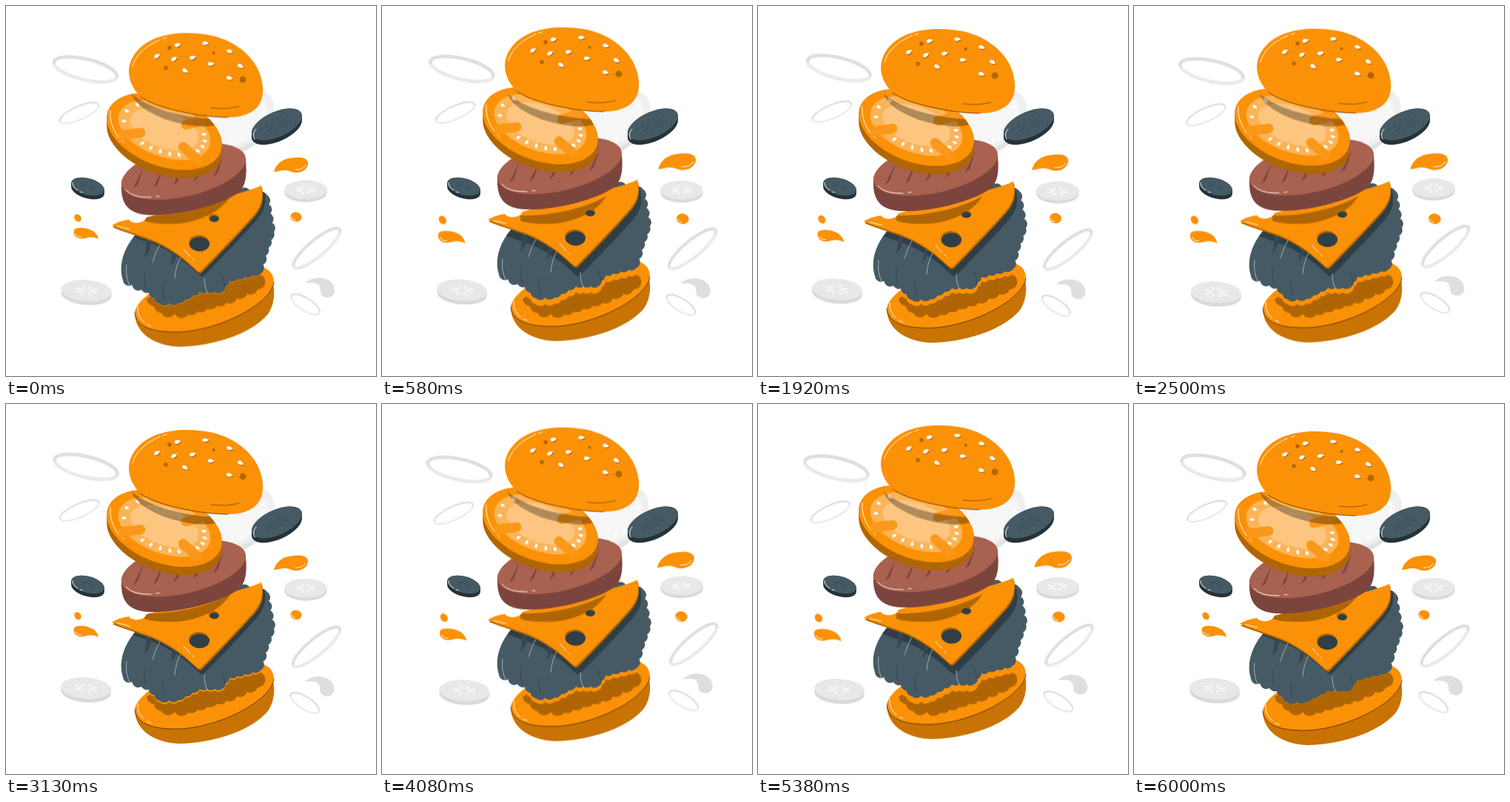
An HTML page that plays this animation: 500 by 500 pixels, repeating every 6.04 s.

```html
<!DOCTYPE html>
<html lang="en">
<head>
<meta charset="utf-8">
<title>Floating burger</title>
<style>
  html, body { margin: 0; width: 100%; height: 100%; overflow: hidden; background: #fff; }
  svg { display: block; width: 100vw; height: 100vh; }
  .sway { transform-origin: 257px 243px; }
  .pulse { transform-origin: 249px 260px; }
  .line { fill: none; stroke-linecap: round; }
</style>
</head>
<body>
<svg id="stage" viewBox="0 0 500 500"></svg>
<script>
const ORANGE = '#fb9106', SIDE = '#c87304', DARK = '#b06603';
const SLATE = '#455a64', INK = '#263238', FOLD = '#36474f';
const MEAT = '#a96150', CRUST = '#7b453e';
const SHADE = 'fill="#000" fill-opacity=".3"';
const RAD = Math.PI / 180;

const range = n => [...Array(n).keys()];
const path = (d, fill, more = '') => `<path d="${d}" fill="${fill}" ${more}/>`;
const line = (d, color, w = 1, more = '') =>
  `<path class="line" d="${d}" stroke="${color}" stroke-width="${w}" ${more}/>`;
const gloss = d => line(d, '#fff', .9);
const oval = (x, y, rx, ry, rot, fill) =>
  `<ellipse rx="${rx}" ry="${ry}" fill="${fill}" transform="translate(${x} ${y}) rotate(${rot})"/>`;
const group = (cls, ...parts) => `<g class="${cls}">${parts.join('')}</g>`;
const clip = (id, d) => `<clipPath id="${id}"><path clip-rule="evenodd" d="${d}"/></clipPath>`;
const clipped = (id, body) => `<g clip-path="url(#${id})">${body}</g>`;
const still = d => `<path class="still" d="${d}" ${SHADE}/>`;

// Point of a tilted ellipse at an angle in degrees
function onOval([x, y, rx, ry, rot], deg, k = 1) {
  const u = rx * k * Math.cos(deg * RAD), v = ry * k * Math.sin(deg * RAD);
  const c = Math.cos(rot * RAD), s = Math.sin(rot * RAD);
  return [x + u * c - v * s, y + u * s + v * c];
}

// Outermost left and right points of a tilted ellipse
function ends([x, y, rx, ry, rot]) {
  const c = Math.cos(rot * RAD), s = Math.sin(rot * RAD);
  const hx = Math.hypot(rx * c, ry * s), hy = (rx * rx - ry * ry) * s * c / hx;
  return [x - hx, y - hy, x + hx, y + hy];
}

// Outline of a thick tilted disc
function hull(geo, depth) {
  const [x1, y1, x2, y2] = ends(geo), [, , rx, ry, rot] = geo;
  const arc = `A${rx} ${ry} ${rot} 0 1`;
  return `M${x1} ${y1}${arc} ${x2} ${y2}v${depth}${arc} ${x1} ${y1 + depth}Z`;
}

const disc = (geo, depth, side, face) => path(hull(geo, depth), side) + oval(...geo, face);

function ring(geo, w) {
  const [x1, y1, x2, y2] = ends(geo), [, , rx, ry, rot] = geo;
  const half = (sweep, color) =>
    line(`M${x1} ${y1}A${rx} ${ry} ${rot} 0 ${sweep} ${x2} ${y2}`, color, w);
  return half(0, '#eaeaea') + half(1, '#dfdfdf');
}

// Bumpy edge: the way between key points is cut into equal bumps
function ruffle(keys, step) {
  let [x, y] = keys[0], d = `M${x} ${y}`;
  for (const [kx, ky] of keys.slice(1)) {
    const n = Math.max(1, Math.round(Math.hypot(kx - x, ky - y) / step));
    for (let i = 1; i <= n; i++)
      d += `A${step * .7} ${step * .7} 0 0 0 ${x + (kx - x) * i / n} ${y + (ky - y) * i / n}`;
    [x, y] = [kx, ky];
  }
  return d;
}

const seed = ([x, y], rot, size = 1, fill = '#fff') =>
  path('M0-5C3-1 4 3 0 4.5C-4 3-3-1 0-5Z', fill,
    `transform="translate(${x} ${y}) rotate(${rot}) scale(${size})"`);

// Seeds on an arc of an ellipse, tips to its centre
const seedArc = (geo, from, to, n, size, fill) => range(n).map(i => {
  const p = onOval(geo, from + (to - from) * i / (n - 1));
  return seed(p, Math.atan2(p[1] - geo[1], p[0] - geo[0]) / RAD - 90, size, fill);
}).join('');

// Cucumber slice with a star of seed marks
function slice(geo, depth, side, face, mark, w) {
  const rays = range(8).map(i => {
    const a = i * 45 + 22;
    return `M${onOval(geo, a, .2)}L${onOval(geo, a, .45)}`;
  }).join('');
  return disc(geo, depth, side, face) + line(rays, mark, w);
}

function greys() {
  const tomato = [313, 154, 54, 35, -35], pulp = [313, 154, 38, 24, -35];
  const pale = (geo, depth) => slice(geo, depth, '#d9d9d9', '#e8e8e8', '#f8f8f8', 2);
  return group('sway',
    ring([107, 86, 43.5, 14, 13], 4.8),
    ring([98.5, 145, 28.5, 9, -24], 2.4),
    ring([420, 327, 40, 11, -40], 4.2),
    ring([405, 403, 22, 8.5, 32], 2.4),
    disc(tomato, 7, '#e2e2e2', '#efefef'),
    oval(...pulp.map((v, i) => i === 2 || i === 3 ? v + 6 : v), '#f6f6f6'),
    seedArc(pulp, 85, 150, 4, .6), seedArc(pulp, -10, 45, 4, .6),
    pale([405, 248, 28.7, 12.8, 0], 4),
    pale([109, 385, 33.8, 14.3, 4], 5),
    path('M405 374C414 364 439 364 444 380C447 391 437 397 429 392C422 388 429 379 420 375C414 373 409 374 405 374Z', '#dedede'));
}

const LEAF = ruffle([[158, 371], [183, 384], [193, 388], [208, 403], [233, 402], [262, 387], [292, 387],
  [302, 372], [344, 362], [351, 338], [362, 306], [353, 256], [318, 247]], 12) +
  'L300 262L178 306C160 325 151 350 158 371Z';
const CHEESE = 'M143 297C153 291 161 290 166 289C169 295 186 296 190 286L300 257C317 253 332 249 345 243' +
  'C348 260 346 270 334 284C312 309 288 333 264 358Q261 361 257 357C240 341 225 329 203 319C185 311 162 305 143 297Z';
const HOLES = 'M274 286a7 5.3 8 1 0 14 2a7 5.3 8 1 0-14-2ZM247 320a14 11 6 1 0 28 2a14 11 6 1 0-28-2Z';

function bottomBun() {
  const body = 'M174 415C174 445 205 461 236 461C290 459 334 440 353 418C365 402 366 375 352 358C330 342 185 370 174 415Z';
  const edge = 'M174 415C176 437 205 442 236 441C290 438 358 403 362 374';
  const shadow = ruffle([[190, 396], [210, 415], [246, 417], [298, 401], [340, 383], [340, 362]], 15) + 'L260 340Z';
  return clip('base', body) + group('float',
    path(body, SIDE),
    path(edge + 'C362 362 355 354 340 352C270 340 178 385 174 415Z', ORANGE),
    clipped('base', still(shadow) + `<path class="still" d="${LEAF}" fill="${ORANGE}"/>`),
    line(edge, '#4a2b05', .8),
    gloss('M178 407Q177 421 187 428M191 431L196 433'));
}

function lettuce() {
  const folds = 'M188 312Q191 326 187 340Q197 332 196 314ZM219 322Q228 336 222 351Q232 344 230 328Z';
  return clip('leaf', LEAF) + group('float',
    path(LEAF, SLATE),
    clipped('leaf', `<g class="still"><path d="${CHEESE}" transform="translate(4 6)" ${SHADE}/></g>` + path(folds, FOLD)),
    line('M209 321Q202 333 198 347M237 338Q229 352 228 368M163 350Q161 366 167 378M268 368Q268 380 272 388', '#b6c3c9', .8),
    line('M187 360Q186 372 189 382M212 377Q211 388 214 397M292 365L296 379', FOLD, .9));
}

function cheese() {
  const body = CHEESE + HOLES;
  return clip('slab', body) + group('float',
    path(body, DARK, 'fill-rule="evenodd" transform="translate(1 2.5)"'),
    path(body, ORANGE, 'fill-rule="evenodd"'),
    clipped('slab', still('M187 283C230 284 275 273 303 257C292 277 262 292 232 294C214 295 196 294 187 290Z')),
    gloss('M151 298L167 302M240 329L249 339M252 342L254 344'));
}

function patty() {
  const grill = range(5).map(i => {
    const x = 186 + 27 * i, y = 218 - i * i;
    return `M${x} ${y}l-14 29l6-5Z`;
  }).join('');
  return group('float',
    path('M156 238C155 262 159 281 193 283C236 285 300 267 317 250C326 239 325 222 324 208Z', CRUST),
    oval(240, 224, 86, 34, -13, MEAT),
    path(grill, CRUST),
    gloss('M162 249Q171 260 196 259M203 258L207 257.5'));
}

function tomato() {
  const geo = [214, 170, 81, 47, 20], pulp = [214, 168, 65, 36, 20], pips = [214, 167, 57, 30, 20];
  const outline = hull(geo, 11);
  const spokes = [36, 138, -50].map(a => `M${onOval(pulp, a, 1.05)}L${onOval(pulp, a, .6)}`).join('');
  return clip('slice', outline) + group('float',
    disc(geo, 11, DARK, ORANGE),
    oval(...pulp, '#fcb457'),
    oval(214, 167, 48, 25, 20, '#fcc681'),
    line(spokes, '#fa981a', 13),
    seedArc(pips, 112, 58, 5, .75), seedArc(pips, 24, -23, 4, .75), seedArc(pips, 164, 218, 3, .75),
    clipped('slice', still('M170 119C192 137 232 150 283 153L286 160C270 165 247 163 215 153C194 144 176 135 170 119Z')),
    gloss('M141 142Q139 160 152 178M156 182L159 185'));
}

function topBun() {
  const dome = 'M166 90C166 70 180 52 205 43C225 36 250 35.5 270 39C305 44 330 65 340 85' +
    'C346 98 349 112 346 124C343 139 328 151 300 151C265 151 220 142 196 132C178 123 167 108 166 90Z';
  const arch = range(5).map(i => onOval([257, 84, 60, 34, 0], 208 + 37 * i));
  const row = range(4).map(i => [227 + 25 * i, 72 - 7 * i + 5.2 * i * i]);
  const sesame = [...arch, ...row, [242, 88]];
  const pits = [[221, 57, 2.7], [280.5, 64, 2.1], [216, 84, 2.7], [320, 100, 4.4]];
  return group('float',
    path(dome, ORANGE),
    line('M182 123C200 138 262 151 300 151', '#5b3503', .8),
    line('M277 138Q298 141 315 136', '#7a4703', .8),
    gloss('M171 82C175 66 190 54 208 46M212 45L217 43'),
    pits.map(([x, y, r]) => oval(x, y, r, r, 0, DARK)).join(''),
    sesame.map(([x, y], i) => {
      const rot = 60 + i % 5 * 15;
      return seed([x + 1, y + 1.2], rot, .95, DARK) + seed([x, y], rot, .95);
    }).join(''));
}

function pickles() {
  return slice([366, 160, 36.5, 17, -24], 6, INK, SLATE, FOLD, .9) +
    slice([110.5, 244, 23, 11, 15], 5, INK, SLATE, FOLD, .7) +
    gloss('M336 180Q332 173 338 166M90 239Q90 245 97 249M100 251L103 252');
}

function drops() {
  return group('pulse',
    oval(97, 286.5, 4.3, 5.5, -35, ORANGE),
    oval(392, 285, 7.6, 6.4, 10, ORANGE),
    path('M92 303C94 299 105 299 113 302C121 305 124 310 125 315C118 312 113 312 106 314C97 316 90 311 92 303Z', ORANGE),
    path('M362 224C365 213 374 206 388 205C402 203 409 207 408 214C406 224 393 228 383 223C375 220 368 224 362 224Z', ORANGE),
    gloss('M94 308Q96 313 102 312M386 285Q387 289 391 289.5M391 221Q401 222 405 215'));
}

const stage = document.getElementById('stage');
const layers = [greys, bottomBun, lettuce, cheese, patty, tomato, topBun, pickles, drops];
stage.innerHTML = layers.map(draw => draw()).join('');

const CYCLE = 1510, LEAD = 40;
const moves = {
  float: [[0, 'translateY(0px)'], [.5, 'translateY(-10px)'], [1, 'translateY(0px)']],
  still: [[0, 'translateY(0px)'], [.5, 'translateY(10px)'], [1, 'translateY(0px)']],
  sway: [[0, 'rotate(0deg)'], [.25, 'rotate(1deg)'], [.75, 'rotate(-1deg)'], [1, 'rotate(0deg)']],
  pulse: [[0, 'scale(1)'], [.2, 'scale(1)'], [.34, 'scale(1.1)'], [.7, 'scale(1.1)'], [.92, 'scale(1)'], [1, 'scale(1)']]
};
for (const [cls, steps] of Object.entries(moves)) {
  const keys = steps.map(([offset, transform]) => ({ offset, transform }));
  for (const el of stage.getElementsByClassName(cls))
    el.animate(keys, { duration: CYCLE, delay: -LEAD, iterations: Infinity });
}
</script>
</body>
</html>
```
